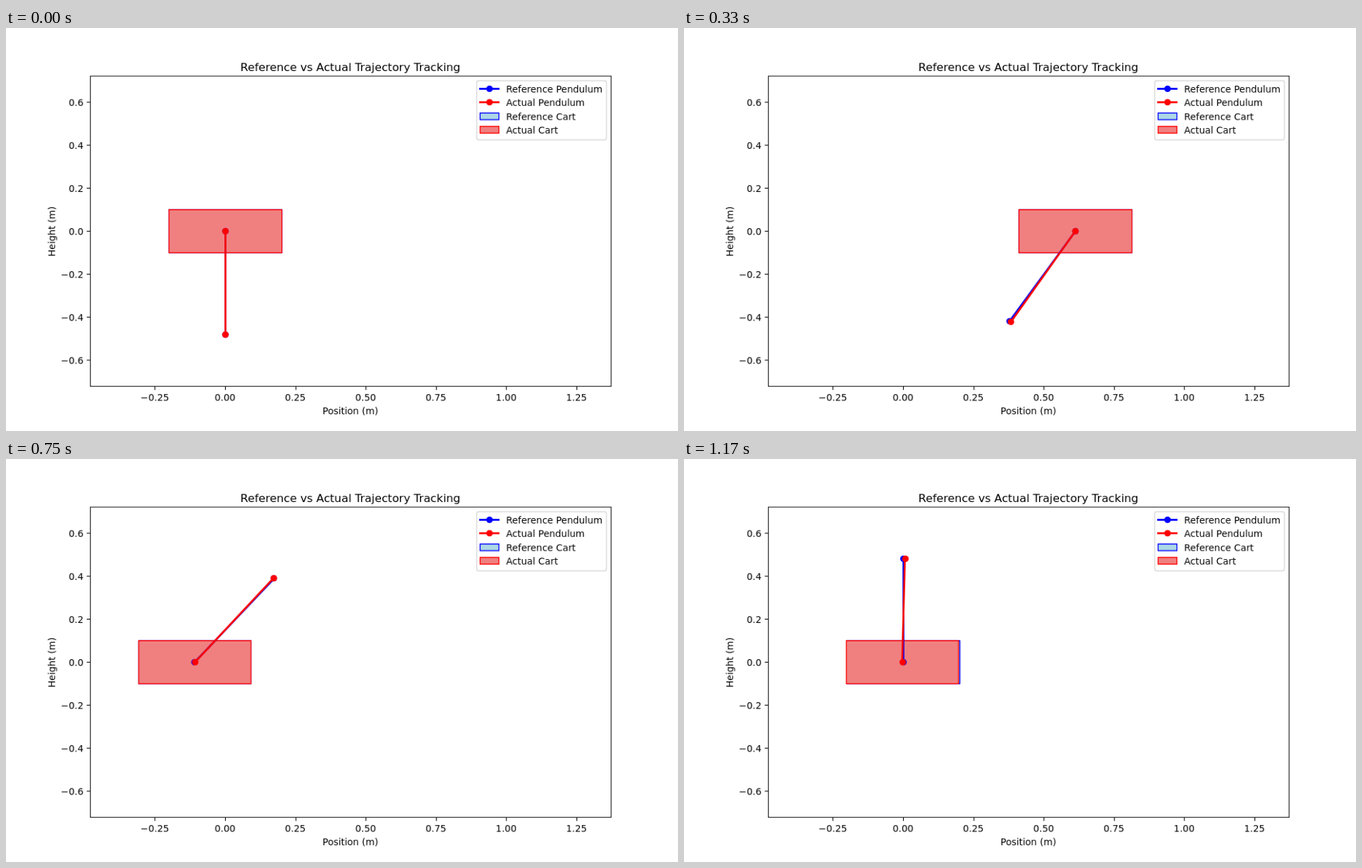
These frames come from a looping animation (966x580 px, 1.2 s). An HTML page with a canvas:

```html
<!DOCTYPE html>
<html lang="en">
<head>
<meta charset="utf-8">
<title>Trajectory tracking</title>
<style>
  html, body { margin: 0; width: 100%; height: 100%; overflow: hidden; background: #fff; }
  canvas { display: block; width: 966px; height: 580px; }
</style>
</head>
<body>
<canvas id="plot" width="1000" height="600"></canvas>
<script>
const ctx = document.getElementById('plot').getContext('2d');
const FRAME = 30, FRAMES = 40, ROD = 0.48;
const PT = 100 / 72;
const AXES = { left: 125, right: 900, top: 72, bottom: 534 };
const STYLES = [
  { name: 'Reference', line: '#0000ff', fill: '#add8e6' },
  { name: 'Actual', line: '#ff0000', fill: '#f08080' },
];

// Key poses: step, cart x and its speed, rod angle and its speed, tracking errors
const KEYS = [
  [0, 0, 0, 0, 0, 0, 0],
  [7, 0.383, 0.067, -0.606, -0.052, 0.001, -0.029],
  [15, 0.624, -0.042, 0.317, 0.315, -0.002, 0.055],
  [19, 0.261, -0.115, 1.593, 0.25, 0.018, 0.057],
  [25, -0.109, -0.015, 2.513, 0.092, 0.001, 0.007],
  [31, -0.064, 0.017, 2.976, 0.05, 0.023, 0.031],
  [39, 0, 0, Math.PI, 0, -0.003, -0.02],
].map(([step, x, dx, angle, dAngle, xError, angleError]) =>
  ({ step, x, dx, angle, dAngle, xError, angleError }));

const px = x => 325.9 + x * 418.4;
const py = y => 303 - y * 320.8;
const crispX = x => Math.floor(x + 0.5) + 0.5;
const crispY = y => Math.ceil(y - 0.5) - 0.5;
const number = (v, digits) => v.toFixed(digits).replace('-', '\u2212');

// Axis-aligned lines sit on pixel centres
function line(x1, y1, x2, y2, color, points) {
  if (Math.abs(x1 - x2) < 0.01) x1 = x2 = crispX(x1);
  if (Math.abs(y1 - y2) < 0.01) y1 = y2 = crispY(y1);
  ctx.strokeStyle = color;
  ctx.lineWidth = points * PT;
  ctx.beginPath();
  ctx.moveTo(x1, y1);
  ctx.lineTo(x2, y2);
  ctx.stroke();
}

function box(x1, y1, x2, y2, stroke, fill, points, radius = 0) {
  const x = crispX(x1), y = crispY(y1);
  ctx.strokeStyle = stroke;
  ctx.fillStyle = fill;
  ctx.lineWidth = points * PT;
  ctx.beginPath();
  ctx.roundRect(x, y, crispX(x2) - x, crispY(y2) - y, radius);
  ctx.fill();
  ctx.stroke();
}

function dot(x, y, color) {
  ctx.fillStyle = color;
  ctx.beginPath();
  ctx.arc(crispX(x), crispY(y), 3.5 * PT, 0, 2 * Math.PI);
  ctx.fill();
}

function rod(x1, y1, x2, y2, color) {
  ctx.lineCap = 'square';
  line(x1, y1, x2, y2, color, 2);
  ctx.lineCap = 'butt';
}

function label(text, x, y, align = 'center', points = 10) {
  ctx.font = `${points * PT}px "DejaVu Sans", sans-serif`;
  ctx.textAlign = align;
  ctx.fillStyle = '#000';
  ctx.fillText(text, x, y);
}

function drawAxes() {
  const { left, right, top, bottom } = AXES;
  const middle = (left + right) / 2, tick = 3.5 * PT;
  box(left, top, right, bottom, '#000', 'transparent', 0.8);
  for (let v = -0.25; v <= 1.25; v += 0.25) {
    line(px(v), bottom, px(v), bottom + tick, '#000', 0.8);
    label(number(v, 2), px(v), 554.5);
  }
  for (let i = -3; i <= 3; i++) {
    const y = py(i * 0.2);
    line(left, y, left - tick, y, '#000', 0.8);
    label(number(i * 0.2, 1), left - 2 * tick, y + 5, 'right');
  }
  label('Reference vs Actual Trajectory Tracking', middle, 64, 'center', 12);
  label('Position (m)', middle, 574.5);
  ctx.save();
  ctx.translate(72.5, 303);
  ctx.rotate(-Math.PI / 2);
  label('Height (m)', 0, 0);
  ctx.restore();
}

function drawLegend() {
  box(699.6, 79, 893, 166.6, 'rgba(204,204,204,0.8)', 'rgba(255,255,255,0.8)', 1, 2.8);
  STYLES.forEach(({ name, line: color, fill }, i) => {
    const y = 91 + 20.4 * i, cartY = y + 41;
    rod(705.5, y, 733, y, color);
    dot(719, y, color);
    box(705.2, cartY - 5, 733, cartY + 5, color, fill, 1);
    label(name + ' Pendulum', 744.2, y + 5, 'left');
    label(name + ' Cart', 744.2, cartY + 5, 'left');
  });
}

function drawCart({ x }, { line: color, fill }) {
  box(px(x - 0.2), py(0.1), px(x + 0.2), py(-0.1), color, fill, 1);
}

function drawPendulum({ x, angle }, { line: color }) {
  const ends = [px(x), py(0), px(x + ROD * Math.sin(angle)), py(-ROD * Math.cos(angle))];
  rod(...ends, color);
  dot(ends[0], ends[1], color);
  dot(ends[2], ends[3], color);
}

// Cubic Hermite curve between two values with given slopes
function hermite(a, b, slopeA, slopeB, span, f) {
  const ease = f * f * (3 - 2 * f), g = 1 - f;
  return a + (b - a) * ease + span * f * g * (slopeA * g - slopeB * f);
}

function posesAt(step) {
  const next = KEYS.findIndex(key => key.step > step);
  const i = next < 0 ? KEYS.length - 2 : next - 1;
  const a = KEYS[i], b = KEYS[i + 1];
  const span = b.step - a.step, f = (step - a.step) / span;
  const blend = (value, slope) =>
    hermite(a[value], b[value], a[slope] || 0, b[slope] || 0, span, f);
  const x = blend('x', 'dx'), angle = blend('angle', 'dAngle');
  return [{ x, angle }, { x: x + blend('xError'), angle: angle + blend('angleError') }];
}

function render(time) {
  const poses = posesAt(Math.floor(time / FRAME) % FRAMES);
  ctx.fillStyle = '#fff';
  ctx.fillRect(0, 0, 1000, 600);
  poses.forEach((pose, i) => drawCart(pose, STYLES[i]));
  poses.forEach((pose, i) => drawPendulum(pose, STYLES[i]));
  drawAxes();
  drawLegend();
}

const start = performance.now();
function tick() {
  render(performance.now() - start);
  requestAnimationFrame(tick);
}
tick();
</script>
</body>
</html>
```
